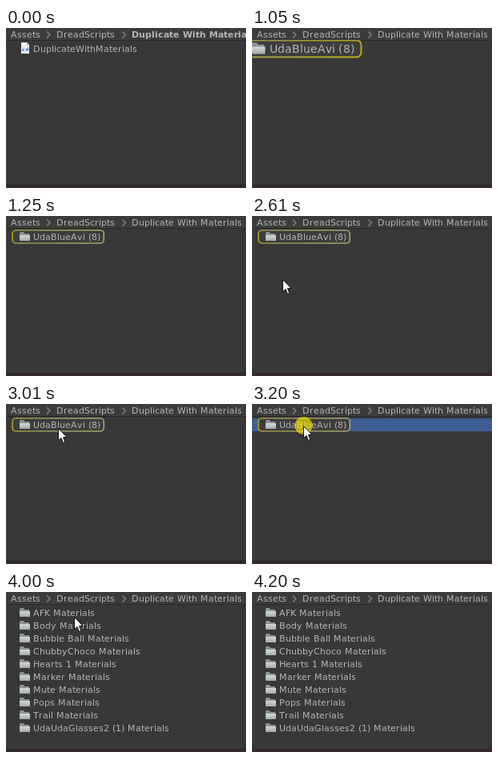
These frames come from a looping animation (300 px wide and 200 px high, 5690 ms). An HTML page with a canvas:

```html
<!DOCTYPE html>
<html lang="en">
<head>
<meta charset="utf-8">
<title>Project window</title>
<style>
  html, body { margin: 0; width: 100%; height: 100%; overflow: hidden; background: #383838; }
  canvas { display: block; }
</style>
</head>
<body>
<canvas id="stage" width="300" height="200"></canvas>
<script>
const ctx = document.getElementById('stage').getContext('2d');
const LOOP = 5690;
const TEXT = '#b4b4b4';
const PING_CENTER = { x: 75, y: 26 };
const FOLDERS = ['AFK', 'Body', 'Bubble Ball', 'ChubbyChoco', 'Hearts 1', 'Marker',
  'Mute', 'Pops', 'Trail', 'UdaUdaGlasses2 (1)'].map(name => name + ' Materials');

// Each step holds until the next: [time, value...]
const PING = [[1050, 1.3], [1110, 1.75], [1180, 1.22], [1250, 1]];
const CURSOR = [
  [2610, 38, 79], [2680, 42, 66], [2745, 50, 47], [2810, 60, 28], [2875, 68, 16],
  [2945, 70, 20], [3010, 65, 30], [3090, 64, 28], [3130, 64, 27], [3570, 64, 28],
  [4000, 85, 31], [4070, 152, 43], [4130, 242, 57], [4200, -50, -50]
];
const stepAt = (steps, t) => steps.filter(step => step[0] <= t).pop();

function rect(x, y, w, h, color) {
  ctx.fillStyle = color;
  ctx.fillRect(x, y, w, h);
}

function polygon(points, fill) {
  ctx.beginPath();
  points.forEach(([x, y]) => ctx.lineTo(x, y));
  ctx.closePath();
  ctx.fillStyle = fill;
  ctx.fill();
}

// Places glyphs on whole pixels, as hinted interface text does
function label(text, x, y, size = 11, weight = 'normal', color = TEXT) {
  ctx.font = `${weight} ${size}px "DejaVu Sans", sans-serif`;
  ctx.fillStyle = color;
  for (const char of text) {
    ctx.fillText(char, x, y);
    x += Math.round(ctx.measureText(char).width + 0.04);
  }
}

function chevron(x) {
  ctx.beginPath();
  ctx.moveTo(x, 4.5);
  ctx.lineTo(x + 4, 8.5);
  ctx.lineTo(x, 12.5);
  ctx.strokeStyle = '#858585';
  ctx.lineWidth = 1.4;
  ctx.stroke();
}

function folder(y) {
  polygon([[17, y - 5], [18, y - 6], [22, y - 6], [23, y - 4], [29, y - 4], [29, y + 4], [17, y + 4]], '#8d9496');
  const shade = ctx.createLinearGradient(0, y - 2, 0, y + 5);
  shade.addColorStop(0, '#d3d9da');
  shade.addColorStop(1, '#a3abad');
  polygon([[17, y - 2], [30, y - 2], [30, y + 5], [17, y + 5]], shade);
}

function scriptRow() {
  polygon([[19, 18], [26, 18], [29, 21], [29, 32], [19, 32]], '#e9eef2');
  polygon([[26, 18], [29, 21], [26, 21]], '#a9b4bd');
  label('c#', 20, 29, 6, 'bold', '#2f6fc0');
  label('DuplicateWithMaterials', 34, 30);
}

function pingRow(scale) {
  const { x, y } = PING_CENTER;
  ctx.save();
  ctx.beginPath();
  ctx.rect(0, 15, 300, 181);
  ctx.clip();

  ctx.save();
  ctx.translate(x, y);
  ctx.scale(scale, scale);
  ctx.translate(-x, -y);
  const edge = ctx.createLinearGradient(7, 0, 123, 0);
  edge.addColorStop(0, '#b0a51c');
  edge.addColorStop(0.12, '#96934c');
  edge.addColorStop(1, scale > 1 ? '#b0a51c' : '#a6a573');
  ctx.beginPath();
  ctx.roundRect(8, 17.8, 114.3, 16.2, 4.5);
  ctx.fillStyle = '#3d3d3d';
  ctx.fill();
  ctx.strokeStyle = edge;
  ctx.lineWidth = 1.6;
  ctx.stroke();
  folder(26);
  ctx.restore();

  label('UdaBlueAvi (8)', Math.round(x + (34 - x) * scale),
    Math.round(y + 4 * scale), Math.round(11 * scale));
  ctx.restore();
}

function cursor(x, y) {
  ctx.save();
  ctx.translate(x + 0.5, y + 0.5);
  polygon([[0, 0], [0, 15], [3.5, 12], [6, 18], [8.3, 17], [6, 11.2], [10.5, 11]], '#fff');
  ctx.strokeStyle = '#111';
  ctx.lineWidth = 1;
  ctx.stroke();
  ctx.restore();
}

function breadcrumb(bold) {
  rect(0, 0, 300, 15, '#3c3c3c');
  rect(0, 15, 300, 1, '#2a2a2a');
  label('Assets', 6, 12);
  chevron(51);
  label('DreadScripts', 63, 12);
  chevron(145.5);
  label('Duplicate With Materials', 157, 12, 11, bold ? 'bold' : 'normal');
}

function draw(t) {
  rect(0, 0, 300, 200, '#383838');
  rect(295, 16, 5, 180, '#363636');
  rect(0, 196, 300, 1, '#292728');
  rect(0, 197, 300, 3, '#35292d');
  breadcrumb(t < 1050);

  if (t < 1050) {
    scriptRow();
  } else if (t < 3320) {
    if (t >= 3200) rect(0, 18, 300, 16, '#3e5f96');
    pingRow(stepAt(PING, t)[1]);
  } else {
    FOLDERS.forEach((name, i) => {
      folder(26 + 16 * i);
      label(name, 34, 30 + 16 * i);
    });
  }

  if (t >= 3200 && t < 3380) {
    ctx.beginPath();
    ctx.arc(64.5, 27, 11, 0, 2 * Math.PI);
    ctx.fillStyle = 'rgba(250, 235, 0, 0.65)';
    ctx.fill();
  }
  const pointer = stepAt(CURSOR, t);
  if (pointer) cursor(pointer[1], pointer[2]);
}

const start = performance.now();
function frame() {
  draw((performance.now() - start) % LOOP);
  requestAnimationFrame(frame);
}
frame();
</script>
</body>
</html>
```
